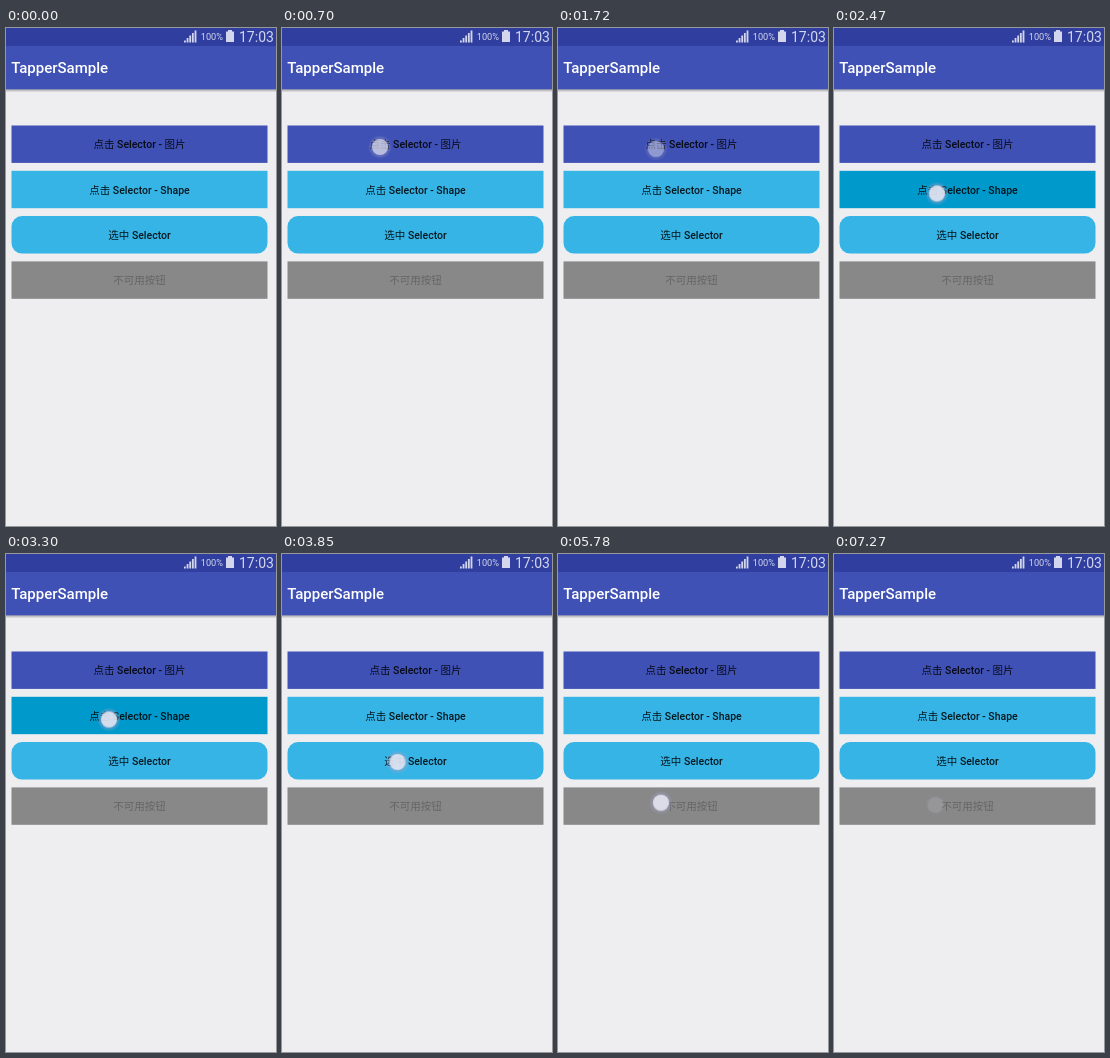
An HTML page for the animation above (7.57 s loop, 270 by 498 pixels).

```html
<!DOCTYPE html>
<html lang="zh">
<head>
<meta charset="utf-8">
<title>TapperSample</title>
<style>
  html, body { margin: 0; width: 100%; height: 100%; overflow: hidden; background: #eeeef0; }
  svg { display: block; width: 100%; height: 100%; }
  text { font-family: Roboto, "Noto Sans CJK SC", "Noto Sans CJK", sans-serif; }
  .label { font-size: 10.5px; font-weight: 500; text-anchor: middle; fill: #000; fill-opacity: .87; }
  .label .han { font-weight: 400; }
  .off { fill-opacity: .26; }
  .status { fill: #d3d6ec; }
</style>
</head>
<body>
<svg viewBox="0 0 270 498" preserveAspectRatio="none">
  <defs>
    <linearGradient id="shade" x2="0" y2="1">
      <stop stop-opacity=".32"/>
      <stop offset="1" stop-opacity="0"/>
    </linearGradient>
    <radialGradient id="halo">
      <stop offset=".62" stop-color="#a2a2c8" stop-opacity=".6"/>
      <stop offset="1" stop-color="#a2a2c8" stop-opacity="0"/>
    </radialGradient>
  </defs>

  <rect y="61" width="270" height="3.5" fill="url(#shade)"/>
  <rect width="270" height="61.3" fill="#3f51b5"/>
  <rect width="270" height="18" fill="#303f9f"/>

  <g class="status">
    <g id="signal"></g>
    <text x="194.8" y="12.3" font-size="9.2">100%</text>
    <path d="M222 2h4v1.6h2V14h-8V3.6h2z"/>
    <text x="233" y="14.2" font-size="14">17:03</text>
  </g>
  <text x="5.3" y="45.4" font-size="15" font-weight="500" fill="#fff">TapperSample</text>

  <g id="buttons"></g>

  <g id="touch" opacity="0">
    <circle r="12" fill="url(#halo)"/>
    <circle r="8" fill="#ececf4" fill-opacity=".82"/>
  </g>
</svg>
<script>
  const LOOP = 7570;
  const INDIGO = '#3f51b5', NAVY = '#303f9f', SKY = '#36b4e6', DEEP = '#0099cc', GRAY = '#888';
  const find = id => document.getElementById(id);

  function add(parent, name, attrs) {
    const node = document.createElementNS('http://www.w3.org/2000/svg', name);
    for (const key in attrs) node.setAttribute(key, attrs[key]);
    return parent.appendChild(node);
  }

  // Plays [time, properties] rows, holding each until the next.
  function play(node, rows) {
    const frames = rows.map(([t, props]) => ({ offset: t / LOOP, easing: 'step-end', ...props }));
    frames.push({ ...frames[frames.length - 1], offset: 1 });
    node.animate(frames, { duration: LOOP, iterations: Infinity });
  }

  for (let i = 0; i < 5; i++) {
    const height = 2 + i * 2.5;
    add(find('signal'), 'rect', { x: 178 + i * 2.65, y: 14.5 - height, width: 1.8, height });
  }

  // Label, idle fill, active fill, times at which the fill toggles
  const buttons = [
    ['点击 Selector - 图片', INDIGO, NAVY, [300, 700, 1300, 1640]],
    ['点击 Selector - Shape', SKY, DEEP, [2180, 2550, 3010, 3400]],
    ['选中 Selector', SKY, DEEP, [4010, 5240]],
    ['不可用按钮', GRAY, GRAY, []]
  ];

  buttons.forEach(([label, idle, active, toggles], i) => {
    const group = find('buttons'), y = 97.5 + i * 45.3;
    const box = add(group, 'rect', { x: 5.5, y, width: 256, height: 37.4, rx: i === 2 ? 10.5 : 0, fill: idle });
    const text = add(group, 'text', { class: idle === GRAY ? 'label off' : 'label', x: 133.5, y: y + 22.9 });
    for (const part of label.split(/([\u4e00-\u9fff]+)/)) {
      const han = /[\u4e00-\u9fff]/.test(part);
      if (part) add(text, 'tspan', { class: han ? 'han' : 'latin' }).textContent = part;
    }
    play(box, [[0, { fill: idle }], ...toggles.map((t, k) => [t, { fill: k % 2 ? idle : active }])]);
  });

  // x, y, finger down, start of fade, end of fade, final opacity
  const taps = [
    [98, 119, 220, 700, 930, 0],
    [98, 121, 1150, 1640, 1870, 0],
    [103, 165.5, 2100, 2480, 2710, 0],
    [103, 165.5, 2930, 3400, 3630, 0],
    [115.5, 208, 3850, 4240, 4470, 0],
    [101.5, 209.5, 4770, 5180, 5410, 0],
    [103, 248.7, 5780, 6260, 6490, 0],
    [101.5, 251, 6640, 7090, 7270, .17]
  ];
  // Small slides while the finger is down: time, x, y
  const slides = [[4840, 105.5, 209.5], [5020, 106.5, 209.5], [6030, 103, 247.5], [6180, 102.5, 246.7]];

  const rows = [[0, { opacity: 0, transform: 'translate(98px, 119px)' }]];
  for (let [x, y, down, fade, end, last] of taps) {
    const row = (t, opacity) => rows.push([t, { opacity, transform: `translate(${x}px, ${y}px)` }]);
    row(down, 1);
    for (const [t, sx, sy] of slides) {
      if (t < down || t > fade) continue;
      [x, y] = [sx, sy];
      row(t, 1);
    }
    const steps = Math.round((end - fade) / 77);
    for (let k = 0; k <= steps; k++) {
      row(fade + (end - fade) * k / steps, last + (1 - last) * .8 * (1 - k / steps));
    }
  }
  play(find('touch'), rows);
</script>
</body>
</html>
```
